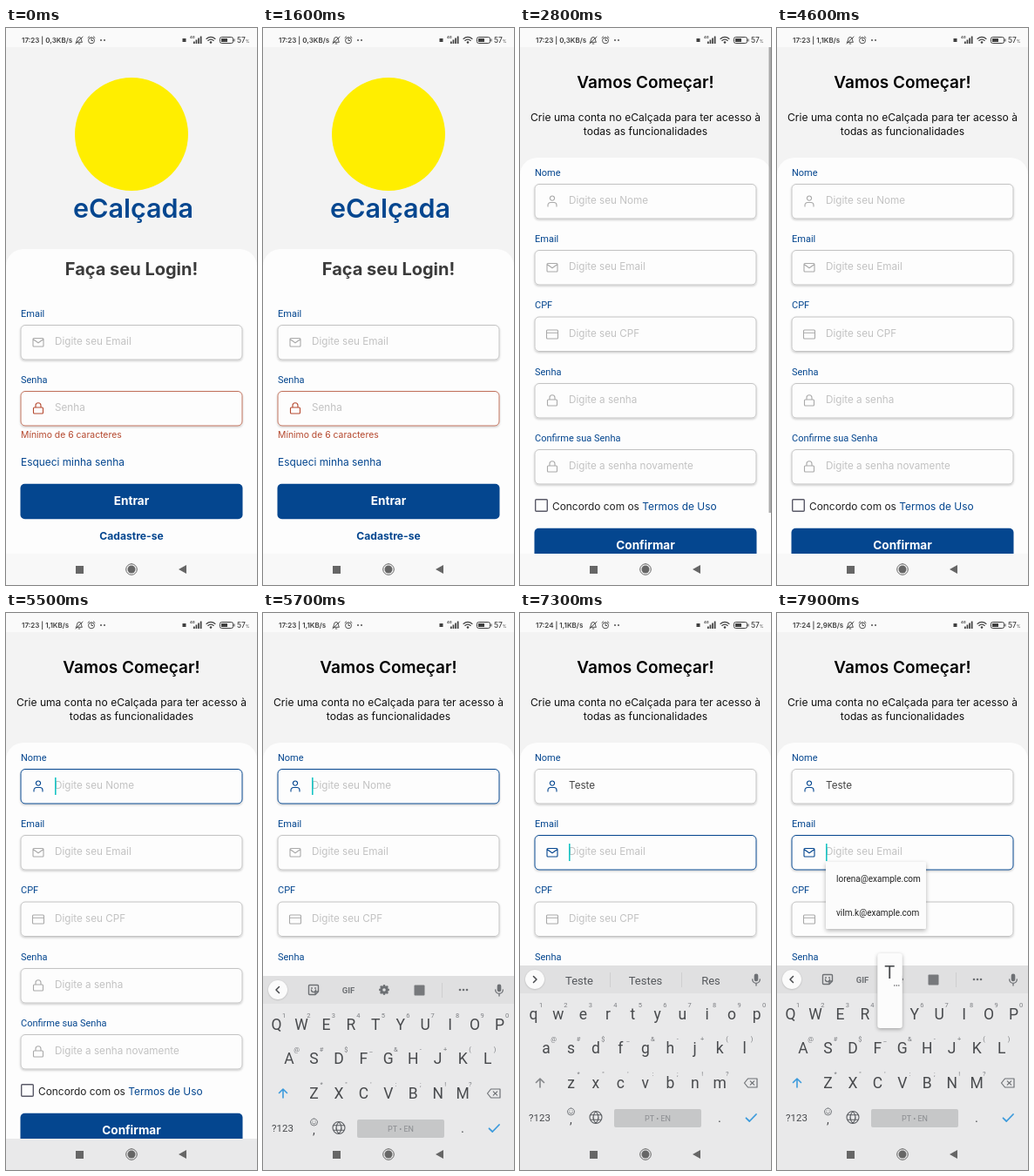
An HTML page with a canvas that plays this animation: 288 by 640 pixels, repeating every 8000 ms.

```html
<!DOCTYPE html>
<html lang="pt-BR">
<head>
<meta charset="utf-8">
<title>Cadastro</title>
<style>
  html, body { margin: 0; width: 100%; height: 100%; overflow: hidden; background: #fdfdfd; }
  canvas { display: block; width: 288px; height: 640px; }
</style>
</head>
<body>
<canvas id="stage" width="288" height="640"></canvas>
<script>
const ctx = document.getElementById('stage').getContext('2d');
const W = 288, H = 640, LOOP = 8000;
const PAGE_TOP = 22, PAGE_END = 604, KEYS_TOP = 405;
const BOX = { x: 16.5, w: 255, h: 40.5, r: 5 };
const BLUE = '#04468f', RED = '#b5492f', GREY = '#a9a9a9', KEY = '#484a4d', CARET = '#18c5c5';
const UI = 'Inter, sans-serif', ROBOTO = 'Roboto, sans-serif';

const clamp = v => Math.min(1, Math.max(0, v));
const progress = (t, start, length) => clamp((t - start) / length);
const easeOut = p => 1 - (1 - p) ** 3;

// y is the middle of the capital letters
function text(str, x, y, size, color, { weight = 400, align = 'left', font = UI } = {}) {
  ctx.font = `${weight} ${size}px ${font}`;
  ctx.textAlign = align;
  ctx.fillStyle = color;
  ctx.fillText(str, x, y + size * 0.36);
  return ctx.measureText(str).width;
}

const centered = (str, x, y, size, color, weight = 400, font = UI) =>
  text(str, x, y, size, color, { weight, font, align: 'center' });

function rect(x, y, w, h, color) {
  ctx.fillStyle = color;
  ctx.fillRect(x, y, w, h);
}

function roundPath(x, y, w, h, r) {
  ctx.beginPath();
  ctx.roundRect(x, y, w, h, r);
}

function roundRect(x, y, w, h, r, color) {
  roundPath(x, y, w, h, r);
  ctx.fillStyle = color;
  ctx.fill();
}

function disc(x, y, r, color) {
  ctx.beginPath();
  ctx.arc(x, y, r, 0, Math.PI * 2);
  ctx.fillStyle = color;
  ctx.fill();
}

// Strokes an SVG path, in coordinates relative to x, y
function line(path, x, y, color, width = 1.1) {
  ctx.save();
  ctx.translate(x, y);
  ctx.strokeStyle = color;
  ctx.lineWidth = width;
  ctx.lineJoin = ctx.lineCap = 'round';
  ctx.stroke(new Path2D(path));
  ctx.restore();
}

function solid(path, x, y, color) {
  ctx.save();
  ctx.translate(x, y);
  ctx.fillStyle = color;
  ctx.fill(new Path2D(path));
  ctx.restore();
}

function shadowed(blur, dy, alpha, draw) {
  ctx.save();
  ctx.shadowColor = `rgba(0,0,0,${alpha})`;
  ctx.shadowBlur = blur;
  ctx.shadowOffsetY = dy;
  draw();
  ctx.restore();
}

const ICON = {
  person: 'M-5 6v-1.5a3 3 0 0 1 3-3h4a3 3 0 0 1 3 3V6M0-6a2.6 2.6 0 1 1 0 5.2a2.6 2.6 0 1 1 0-5.2',
  mail: 'M-5-4.5H5q1 0 1 1V4q0 1-1 1H-5q-1 0-1-1V-3.5q0-1 1-1M-6-3.5L0 .8L6-3.5',
  card: 'M-5.5-4.5h11q1 0 1 1v8q0 1-1 1h-11q-1 0-1-1v-8q0-1 1-1M-6.5-1.2h13',
  lock: 'M-4.5-1h9q1 0 1 1v5q0 1-1 1h-9q-1 0-1-1V0q0-1 1-1M-3-1v-2.2a3 3 0 0 1 6 0V-1'
};

function field(top, label, hint, icon, { value = '', focus, error, composing, caret } = {}) {
  const accent = error ? RED : focus || value ? BLUE : GREY;
  const y = top + 19;
  text(label, 17, top - 13, 11, BLUE, { font: ROBOTO });
  shadowed(2.5, 1.2, 0.2, () => roundRect(BOX.x, top, BOX.w, BOX.h, BOX.r, '#fdfdfd'));
  roundPath(BOX.x + 0.5, top + 0.5, BOX.w - 1, BOX.h - 1, BOX.r);
  ctx.lineWidth = 1;
  ctx.strokeStyle = error ? '#c0705a' : focus ? BLUE : '#c3c3c3';
  ctx.stroke();
  line(ICON[icon], 37, top + 20, accent);
  const width = text(value || hint, 56, y, 11.7, value ? '#444' : '#c2c2c2');
  if (composing) rect(56, y + 6, width, 1, '#555');
  if (caret) rect(56 + (value ? width : 0), top + 10, 1.6, 20, CARET);
}

function button(label, top) {
  roundRect(BOX.x, top - 0.25, BOX.w, BOX.h, BOX.r, BLUE);
  centered(label, 144, top + 19, 13.6, '#fff', 700);
}

function sheet(cardTop) {
  rect(0, PAGE_TOP, W, H, '#f3f3f3');
  roundRect(0, cardTop, W, H, [20, 20, 0, 0], '#fdfdfd');
}

function loginPage() {
  sheet(254);
  disc(144, 122, 65, '#ffee00');
  centered('eCalçada', 146, 207, 30.5, BLUE, 600);
  centered('Faça seu Login!', 144, 277, 20, '#3b3b3b', 700);
  field(341, 'Email', 'Digite seu Email', 'mail');
  field(417, 'Senha', 'Senha', 'lock', { error: true });
  text('Mínimo de 6 caracteres', 17, 467, 10.4, RED);
  text('Esqueci minha senha', 17, 499, 11.9, BLUE);
  button('Entrar', 524);
  centered('Cadastre-se', 144, 583.5, 12.1, BLUE, 700);
}

function typedName(t) {
  const presses = [6200, 6300, 6400, 6700, 6900];
  return 'Teste'.slice(0, presses.filter(at => t >= at).length);
}

function caretOn(t) {
  const resets = [5400, 6200, 6400, 6900, 7450];
  const last = resets.filter(at => t >= at).pop();
  return last !== undefined && (t - last) % 1000 < 500;
}

function signUpPage(t) {
  const onName = t >= 5400 && t < 7300, onEmail = t >= 7300;
  const name = typedName(t);
  sheet(149);
  centered('Vamos Começar!', 144, 62.5, 19, '#000', 600);
  centered('Crie uma conta no eCalçada para ter acesso à', 144, 102.7, 12.1, '#111');
  centered('todas as funcionalidades', 144, 118.7, 12.1, '#111');
  field(179, 'Nome', 'Digite seu Nome', 'person',
    { value: name, focus: onName, composing: name && onName, caret: onName && caretOn(t) });
  field(255, 'Email', 'Digite seu Email', 'mail', { focus: onEmail, caret: onEmail && caretOn(t) });
  field(331.5, 'CPF', 'Digite seu CPF', 'card');
  field(408, 'Senha', 'Digite a senha', 'lock');
  field(484, 'Confirme sua Senha', 'Digite a senha novamente', 'lock');
  roundPath(17.7, 541.7, 13.6, 13.6, 1);
  ctx.lineWidth = 1.4;
  ctx.strokeStyle = '#5a5a68';
  ctx.stroke();
  const width = text('Concordo com os ', 37, 549.5, 11.9, '#222');
  text('Termos de Uso', 37 + width, 549.5, 11.9, BLUE);
  button('Confirmar', 575);
  const fade = 1 - progress(t, 3550, 250);
  if (fade) rect(285.5, PAGE_TOP, 2.5, 535, `rgba(120,120,120,${0.6 * fade})`);
}

function emailOptions(t) {
  ctx.save();
  ctx.globalAlpha = progress(t, 7450, 120);
  shadowed(5, 2, 0.3, () => roundRect(56, 286, 115, 77, 1, '#fcfcfc'));
  text('lorena@example.com', 68, 305, 10, '#222', { font: ROBOTO });
  text('vilm.k@example.com', 68, 344, 10, '#222', { font: ROBOTO });
  ctx.restore();
}

const ROWS = [
  { keys: 'QWERTYUIOP', hints: '1234567890', x: 15.5, y: 461 },
  { keys: 'ASDFGHJKL', hints: '@#$_&-+()', x: 30, y: 500 },
  { keys: 'ZXCVBNM', hints: '*"\':;!?', x: 58.5, y: 540 }
];
const STEP = 28.45;

function toolbar(name, suggesting) {
  const y = 421;
  const word = (str, x) => centered(str, x, y + 1, 13, '#55585c', 400, ROBOTO);
  rect(0, KEYS_TOP, W, 32, '#e0e0e1');
  shadowed(2, 0.5, 0.2, () => disc(17, y, 11, '#fbfbfb'));
  line(suggesting ? 'M-1.5-3.5L2 0L-1.5 3.5' : 'M1.5-3.5L-2 0L1.5 3.5', 17, y, KEY, 1.5);
  solid('M0-6.5q2.3 0 2.3 2.3V0q0 2.3-2.3 2.3T-2.3 0v-4.2Q-2.3-6.5 0-6.5', 271, y, '#6d7074');
  line('M-4.3 0a4.3 4.3 0 0 0 8.6 0M0 4.5V7', 271, y, '#6d7074', 1.3);
  if (suggesting) {
    word(name, 68);
    word(name === 'Teste' ? 'Testes' : 'Teste', 144);
    word('Res', 219);
    rect(103, 413, 1, 17, '#cfcfd0');
    rect(185, 413, 1, 17, '#cfcfd0');
    return;
  }
  line('M-4.5-5.5h9q1 0 1 1V2L2 5.5h-6.5q-1 0-1-1v-9q0-1 1-1M5.5 2H2V5.5M-2.5 0a2.5 2.5 0 0 0 5 0', 58, y, '#6d7074', 1.4);
  disc(56, 419, 0.9, '#6d7074');
  disc(60, 419, 0.9, '#6d7074');
  centered('GIF', 98, y + 0.5, 9.5, '#6d7074', 700, ROBOTO);
  for (let i = 0; i < 8; i++) {
    const a = i * Math.PI / 4;
    disc(139 + 4.6 * Math.cos(a), y + 4.6 * Math.sin(a), 1.4, '#6d7074');
  }
  disc(139, y, 4.6, '#6d7074');
  disc(139, y, 1.8, '#e0e0e1');
  roundRect(173.5, 415.5, 12, 12, 1, '#77797c');
  rect(205, 413, 1, 17, '#cfcfd0');
  for (const x of [226, 230, 234]) disc(x, y, 1.3, '#6d7074');
}

function bottomRow() {
  const y = 580;
  centered('?123', 22.5, y, 11.5, KEY, 400, ROBOTO);
  line('M0-4a4 4 0 1 1 0 8a4 4 0 1 1 0-8M-2 .8a2.2 2.2 0 0 0 4 0M-1.5-1.2v.2M1.5-1.2v.2', 58.5, 573, '#6d7074', 0.9);
  centered(',', 58.5, 582, 14, KEY, 400, ROBOTO);
  line('M0-7a7 7 0 1 1 0 14a7 7 0 1 1 0-14M0-7q-6 7 0 14M0-7q6 7 0 14M-6.2-2.7H6.2M-6.2 2.7H6.2', 87, 579.5, '#595c60', 1.1);
  roundRect(108, 570, 100, 21, 2, '#c6c7c8');
  centered('PT • EN', 158, 581, 9, '#8b8d90', 400, ROBOTO);
  centered('.', 229, y, 15, KEY, 400, ROBOTO);
  line('M-5.5 .3L-1.7 4L6-4', 265, y, '#3d9bdc', 1.8);
}

function keyPopup(char, x, y) {
  shadowed(4, 1.5, 0.3, () => roundRect(x - 14, y - 70, 28.5, 86, 3, '#fcfcfc'));
  centered(char, x, y - 48, 20, KEY, 400, ROBOTO);
  for (const dx of [5.5, 8, 10.5]) disc(x + dx, y - 33, 0.7, KEY);
}

function pressedKey(t) {
  if (t >= 6550 && t < 6700) return 'T';
  if (t >= 6800 && t < 6900) return 'E';
  return t >= 7850 ? 'T' : '';
}

function keyboard(t) {
  const name = typedName(t);
  const caps = !name || t >= 7400;
  const pressed = pressedKey(t);
  const styled = c => caps ? c : c.toLowerCase();
  ctx.save();
  ctx.translate(0, Math.round(235 * (1 - easeOut(progress(t, 5500, 320)))));
  rect(0, KEYS_TOP, W, H, '#e9e9ea');
  toolbar(name, !caps);
  for (const { keys, hints, x, y } of ROWS) {
    [...keys].forEach((char, i) => {
      const cx = x + i * STEP;
      centered(styled(char), cx, y, 17.5, KEY, 400, ROBOTO);
      centered(hints[i], cx + 8.5, y - 11, 7.5, '#7c7e82', 400, ROBOTO);
    });
  }
  line('M0 5V-5M-4.5-.5L0-5L4.5-.5', 23, 540, caps ? '#3d9bdc' : '#85878a', 1.6);
  line('M-7.5 0L-3.5-5H7V5H-3.5ZM-.7-2.2L3.7 2.2M3.7-2.2L-.7 2.2', 265, 540, '#6d7074', 1.2);
  bottomRow();
  if (pressed) {
    const { keys, x, y } = ROWS[0];
    keyPopup(styled(pressed), x + keys.indexOf(pressed) * STEP, y);
  }
  ctx.restore();
}

function statusBar(t) {
  const ink = '#3f3f3f', y = 14;
  const clock = t < 6800 ? '17:23' : '17:24';
  const rate = t < 3500 ? '0,3' : t < 7850 ? '1,1' : '2,9';
  rect(0, 0, W, PAGE_TOP, '#fafafa');
  text(`${clock} | ${rate}KB/s`, 18, y, 8, ink, { weight: 600 });
  line('M-3.5 2.3h7q-1-1-1-3a2.5 2.8 0 0 0-5 0q0 2-1 3M-.8 4h1.6M-4 4L4-4', 84, y, ink, 0.9);
  line('M0-3.2a3.5 3.5 0 1 1 0 7a3.5 3.5 0 1 1 0-7M-4-2.8L-2.4-4.2M4-2.8L2.4-4.2M0-1.5V.5H1.6', 98, y, ink, 0.9);
  disc(109, y, 0.9, ink);
  disc(113, y, 0.9, ink);
  rect(202.5, 12, 4, 4, ink);
  text('4G', 211, 11, 4, ink, { weight: 700 });
  for (let i = 0; i < 4; i++) rect(215 + i * 2.6, 15.5 - i * 2, 1.7, 2.5 + i * 2, ink);
  line('M-5-1.5a7 7 0 0 1 10 0M-3.2 .5a4.5 4.5 0 0 1 6.4 0', 235, y, ink, 1.1);
  disc(235, 16.5, 1.3, ink);
  roundPath(245.5, 10.5, 15, 7, 2);
  ctx.lineWidth = 1;
  ctx.strokeStyle = ink;
  ctx.stroke();
  rect(247, 12, 7, 4, ink);
  rect(261.5, 12.5, 1, 3, ink);
  text('57', 265, y, 8.4, ink, { weight: 500 });
  text('%', 275, 15.5, 4.5, ink);
}

function navIcons() {
  const ink = '#666';
  rect(80, 618, 9, 9, ink);
  disc(144, 622, 4.5, ink);
  line('M0-6.3a6.3 6.3 0 1 1 0 12.6a6.3 6.3 0 1 1 0-12.6', 144, 622, ink, 1);
  solid('M-5 0L4-5V5Z', 203, 622, ink);
}

function pages(t) {
  const shift = Math.round(W * easeOut(progress(t, 2457, 380)));
  const end = t >= 5650 ? KEYS_TOP : PAGE_END;
  ctx.save();
  ctx.beginPath();
  ctx.rect(0, PAGE_TOP, W, end - PAGE_TOP);
  ctx.clip();
  ctx.translate(-shift, 0);
  if (shift < W) loginPage();
  ctx.translate(W, 0);
  if (shift > 0) signUpPage(t);
  ctx.restore();
}

function draw(t) {
  rect(0, 0, W, H, '#fdfdfd');
  pages(t);
  if (t >= 7450) emailOptions(t);
  rect(0, PAGE_END, W, H - PAGE_END, t >= 5500 ? '#e9e9ea' : '#f8f8f8');
  if (t >= 5500) {
    ctx.save();
    ctx.beginPath();
    ctx.rect(0, 0, W, PAGE_END);
    ctx.clip();
    keyboard(t);
    ctx.restore();
  }
  statusBar(t);
  navIcons();
}

function tick() {
  draw(performance.now() % LOOP);
  requestAnimationFrame(tick);
}
tick();
</script>
</body>
</html>
```
